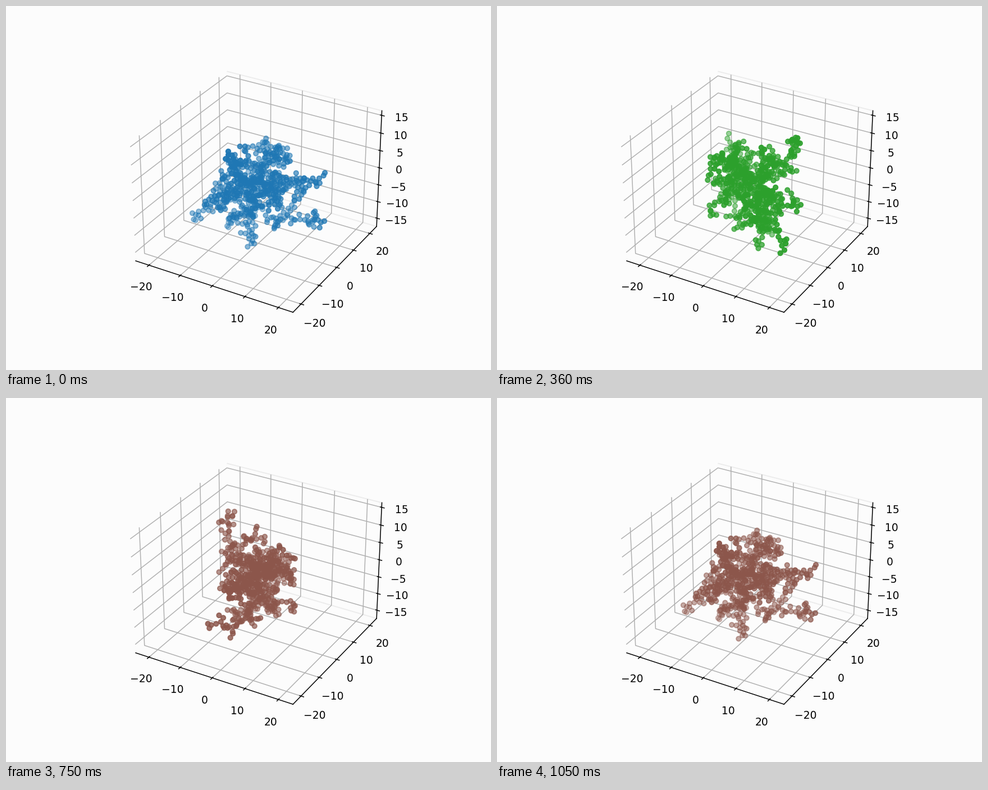
These frames come from a looping animation (864 px wide and 648 px high, 1.08 s). A matplotlib script:

```python
import numpy as np
import matplotlib.pyplot as plt
from matplotlib.animation import FuncAnimation

FRAMES, LOOP_MS = 36, 1080
COUNT, STEP, CORE = 600, 1.35, 13.5
BG = "#fcfcfc"

# Ends of the longest arms, as seen by the camera: right, away, up
TIPS = [(18, -10, -5), (-2, -5, -15), (-7, -8, 13.5), (-18, 1.5, -11),
        (-9, 3, -15), (18, -4, 4), (15, -4, -9), (-15, -6, -2),
        (-6, -12, 9.5), (6, 6, 8)]


def unit(v):
    return v / np.linalg.norm(v)


def closest(nodes, p, pull=0.0):
    """Nearest node and its distance; pull favours nodes near the centre."""
    pts = np.array(nodes)
    gaps = np.linalg.norm(pts - p, axis=1)
    k = np.argmin(gaps + pull * np.linalg.norm(pts, axis=1))
    return pts[k], gaps[k]


def grow_cluster(rng):
    """Grow the long arms first, then side branches towards random goals."""
    nodes = [np.zeros(3)]
    for tip in sorted(np.array(TIPS), key=np.linalg.norm):
        p, gap = closest(nodes, tip, pull=0.7)
        while gap > STEP:
            p = p + STEP * unit(unit(tip - p) + rng.normal(0, 0.4, 3))
            nodes.append(p)
            gap = np.linalg.norm(tip - p)

    arms = np.array(nodes)
    while len(nodes) < COUNT:
        if rng.random() < 0.25:
            goal = rng.choice(arms) + rng.normal(0, 1.8, 3)
        else:
            goal = CORE * rng.random() ** 0.45 * unit(rng.normal(size=3))
        base, gap = closest(nodes, goal)
        if gap < 0.5 * STEP:
            continue
        new = base + STEP * unit(goal - base)
        if closest(nodes, new)[1] > 0.8 * STEP:
            nodes.append(new)
    return np.array(nodes)


def spin(points, angle):
    c, s = np.cos(angle), np.sin(angle)
    x, y, z = points.T
    return c * x - s * y, s * x + c * y, z


cluster = grow_cluster(np.random.default_rng(7))

fig = plt.figure(figsize=(6.4, 4.8), dpi=135, facecolor=BG)
ax = fig.add_subplot(projection="3d", facecolor=BG)
ax.set(xlim=(-24.3, 24.3), ylim=(-24.3, 24.3), zlim=(-17.5, 16.3),
       xticks=range(-20, 21, 10), yticks=range(-20, 21, 10),
       zticks=range(-15, 16, 5))
for axis in (ax.xaxis, ax.yaxis, ax.zaxis):
    axis.pane.set(alpha=None, facecolor="none", edgecolor="none")
ax.yaxis.pane.set_edgecolor("#ececec")

drawn = []


def update(i):
    while drawn:
        drawn.pop().remove()
    angle = np.pi / 6 + 2 * np.pi * i / (FRAMES - 1)
    drawn.append(ax.scatter(*spin(cluster, angle), color=f"C{i % 10}"))
    return drawn


anim = FuncAnimation(fig, update, frames=FRAMES, init_func=lambda: [],
                     interval=LOOP_MS / FRAMES, repeat=True, repeat_delay=0)
plt.show()
```
